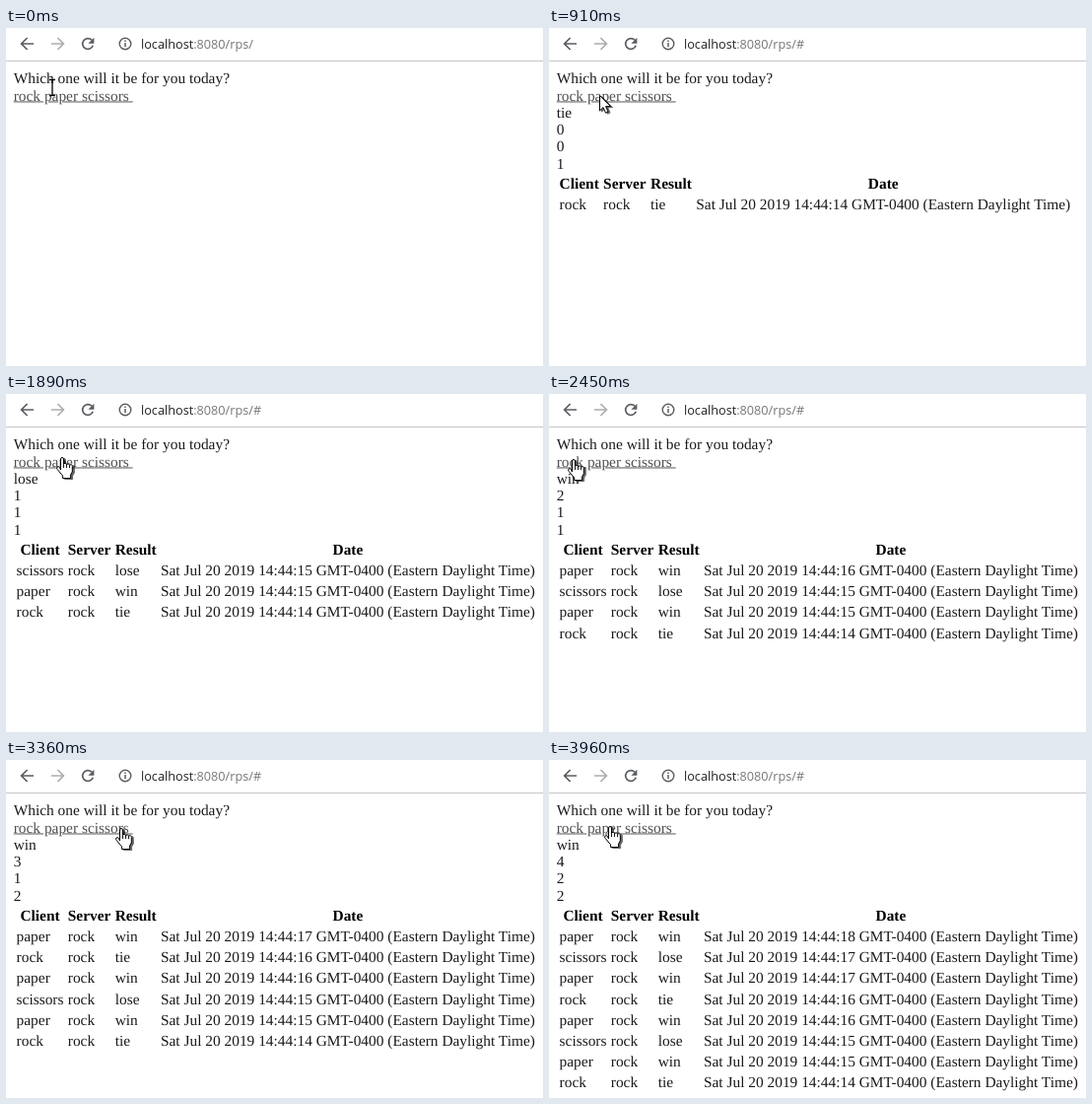
An HTML page that plays this animation: 545x343 px, repeating every 4.56 s.

```html
<!DOCTYPE html>
<html lang="en">
<head>
<meta charset="utf-8">
<title>Rock paper scissors</title>
<style>
  html, body { margin: 0; width: 100%; height: 100%; overflow: hidden; background: #fff; }
  #stage { position: relative; width: 545px; height: 343px; overflow: hidden; background: #fff; }
  svg { position: absolute; left: 0; top: 0; overflow: visible; }
  #address {
    position: absolute; left: 137px; top: 7px; line-height: 18px; white-space: pre;
    font-family: "Open Sans", "Noto Sans", sans-serif; font-size: 12.7px; color: #777;
  }
  #address b { font-weight: normal; color: #222; }
  #page {
    position: absolute; left: 0; top: 35.6px; width: 900px; padding: 8px; box-sizing: border-box;
    transform: scale(.962); transform-origin: 0 0;
    font: 16px/18px "Liberation Serif", serif; color: #1a1a1a;
    text-rendering: geometricPrecision; white-space: nowrap;
  }
  #page u { color: #505050; white-space: pre; }
  table { border-spacing: 2px; border-collapse: separate; }
  th, td { padding: 1px 1.5px 1px 1px; line-height: 18px; }
  th { color: #000; }
  .pointer { filter: drop-shadow(2px 1.5px .7px rgba(0, 0, 0, .6)); }
</style>
</head>
<body>
<div id="stage">
  <svg width="545" height="343" fill="none" stroke="#5a5d61" stroke-width="1.7">
    <path d="M0 33.5H545" stroke="#c6c6c6" stroke-width="1"/>
    <path d="M28 16H15.8M21.6 10L15.6 16l6 6"/>
    <path d="M46 16H58.2M52.4 10l6 6-6 6" stroke="#adadad"/>
    <path d="M87 12.2A5.4 5.4 0 1 0 88.2 17.7"/>
    <path d="M89.4 9.8v6h-6z" fill="#5a5d61" stroke="none"/>
    <circle cx="121" cy="16" r="5.8" stroke-width="1.4"/>
    <path d="M121 15v4.2M121 12.4v1.5" stroke-width="1.5"/>
  </svg>
  <div id="address"><b>localhost</b>:8080/rps/<span id="hash"></span></div>
  <div id="page">
    <div>Which one will it be for you today?</div>
    <div><u>rock paper scissors </u></div>
    <div id="results"></div>
  </div>
  <svg width="545" height="343">
    <g id="cursor" stroke="#000" stroke-linejoin="round">
      <path id="beam" fill="none" stroke-width="1.3" d="M-3 -7.5h2.2L0 -6.8L.8 -7.5H3M0 -7V8M-3 8.5h2.2L0 7.8L.8 8.5H3"/>
      <path id="arrow" class="pointer" fill="#fff" d="M.5 .5V16L4 12.6L6.5 18.2L9 17L6.6 11.6H11.5Z"/>
      <g id="hand" class="pointer">
        <path fill="#fff" d="M-1.5 13V2a1.5 1.5 0 0 1 3 0V7.5a1.5 1.4 0 0 1 3 .5a1.5 1.4 0 0 1 3 .7a1.4 1.4 0 0 1 2.8 1V15L8.6 18V21.5H.6V19L-5 12.3a1.5 1.5 0 0 1 2.2 -2.2Z"/>
        <path fill="none" d="M1.5 7.5v3.5M4.5 8v3M7.5 8.8v2.4" stroke-width=".9"/>
      </g>
    </g>
  </svg>
</div>
<script>
const LOOP = 4560, TICK = 61;
const byId = id => document.getElementById(id);

// tick shown, client's choice, outcome, second of the clock
const plays = [
  [8, "rock", "tie", 14], [17, "paper", "win", 15], [24, "scissors", "lose", 15],
  [32, "paper", "win", 16], [41, "rock", "tie", 16], [48, "paper", "win", 17],
  [56, "scissors", "lose", 17], [65, "paper", "win", 18]
];

// tick, x, y of the pointer's hot spot
const path = [
  [0, 47, 60], [1, 44, 61], [2, 38, 65], [5, 25, 66], [10, 25, 67], [15, 51, 68],
  [18, 74, 66], [19, 107, 69], [24, 107, 69], [31, 57, 64], [32, 57, 64],
  [36, 18, 66], [39, 18, 66], [40, 25, 66], [42, 27, 66], [47, 60, 63],
  [49, 64, 66], [55, 117, 69], [57, 117, 69], [64, 62, 67], [75, 62, 67]
];

const pointerAt = tick =>
  tick < 2 ? "beam" : tick === 14 || tick === 15 ? "arrow" : "hand";

function positionAt(tick) {
  const i = path.findIndex(p => p[0] > tick);
  if (i < 0) return path[path.length - 1].slice(1);
  const [t0, x0, y0] = path[i - 1], [t1, x1, y1] = path[i];
  const k = (tick - t0) / (t1 - t0);
  return [x0 + (x1 - x0) * k, y0 + (y1 - y0) * k].map(Math.round);
}

const cells = (tag, texts) =>
  "<tr>" + texts.map(t => `<${tag}>${t}</${tag}>`).join("") + "</tr>";

function resultsHtml(done) {
  if (!done.length) return "";
  const count = outcome => done.filter(p => p[2] === outcome).length;
  const lines = [done[done.length - 1][2], count("win"), count("lose"), count("tie")];
  const rows = done.map(([, client, outcome, second]) => cells("td", [
    client, "rock", outcome,
    `Sat Jul 20 2019 14:44:${second} GMT-0400 (Eastern Daylight Time)`
  ])).reverse();
  return lines.map(l => `<div>${l}</div>`).join("") +
    `<table>${cells("th", ["Client", "Server", "Result", "Date"])}${rows.join("")}</table>`;
}

let shownCount = -1;
function draw(time) {
  const tick = Math.floor((time + 10) / TICK);
  const done = plays.filter(p => p[0] <= tick);
  if (done.length !== shownCount) {
    shownCount = done.length;
    byId("results").innerHTML = resultsHtml(done);
    byId("hash").textContent = shownCount ? "#" : "";
  }
  const pointer = pointerAt(tick);
  for (const id of ["beam", "arrow", "hand"])
    byId(id).style.display = id === pointer ? "" : "none";
  byId("cursor").setAttribute("transform", `translate(${positionAt(tick)})`);
}

const start = performance.now();
function loop() {
  draw((performance.now() - start) % LOOP);
  requestAnimationFrame(loop);
}
loop();
</script>
</body>
</html>
```
